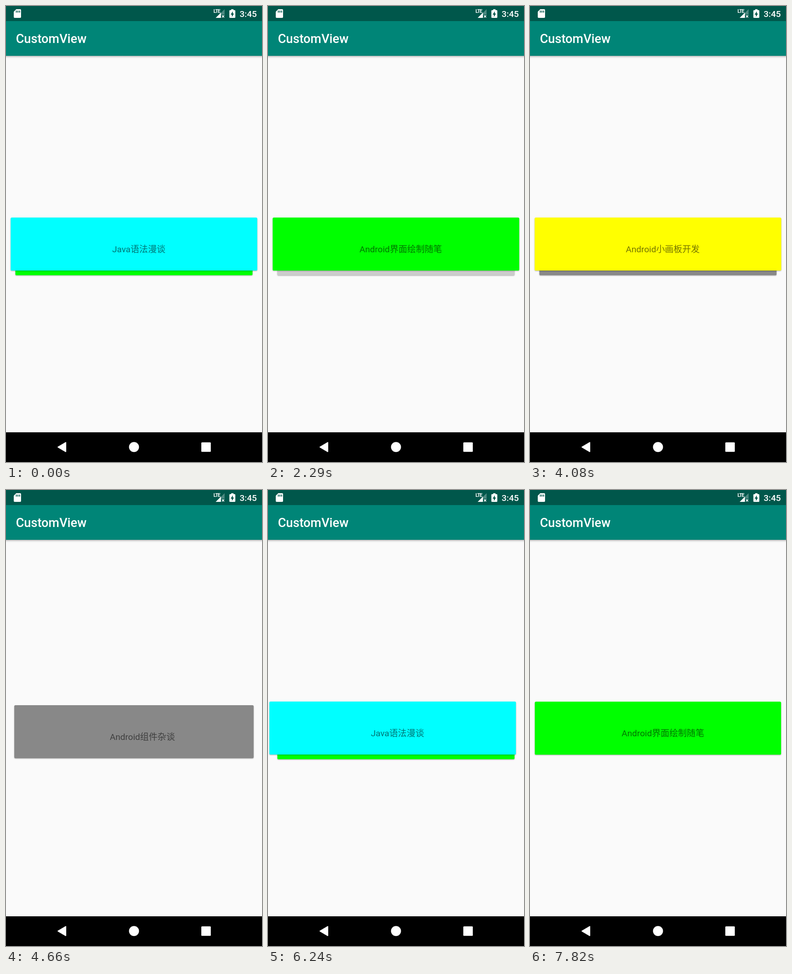
These frames come from a looping animation (561 px wide and 998 px high, 8 s). An HTML page:

```html
<!DOCTYPE html>
<html lang="zh">
<head>
<meta charset="utf-8">
<title>CustomView</title>
<style>
  html, body { margin: 0; width: 100%; height: 100%; overflow: hidden; background: #fafafa; }
  svg { display: block; width: 561px; height: 998px; }
  text { font-family: Roboto, "Noto Sans CJK SC", "Noto Sans CJK", sans-serif; }
  .bar { fill: #fff; font-weight: 500; }
  .card rect { filter: drop-shadow(0 1.4px 1.3px rgba(0, 0, 0, .32)); }
  .card text { font-size: 19.1px; text-anchor: middle; fill: #000; fill-opacity: .54; }
</style>
</head>
<body>
<svg viewBox="0 0 561 998">
  <defs>
    <linearGradient id="shade" x2="0" y2="1">
      <stop offset="0" stop-opacity=".3"/>
      <stop offset=".4" stop-opacity=".1"/>
      <stop offset="1" stop-opacity="0"/>
    </linearGradient>
  </defs>
  <rect width="561" height="998" fill="#fafafa"/>
  <rect y="109" width="561" height="6" fill="url(#shade)"/>
  <rect y="32" width="561" height="77" fill="#008577"/>
  <rect width="561" height="33" fill="#00574b"/>
  <text class="bar" x="21.8" y="81" font-size="27.3">CustomView</text>

  <!-- status icons -->
  <path fill="#fff" d="M22.5 7H31q2 0 2 2v15q0 2-2 2H19q-2 0-2-2V12.500z"/>
  <path stroke="#00574b" stroke-width="1.8" d="M22.600 10v4.500M26.200 10v4.500M29.800 10v4.500"/>
  <text class="bar" x="454.800" y="15" font-size="10.5" letter-spacing="-1" style="font-weight:700">LTE</text>
  <path fill="#fff" fill-opacity=".3" d="M471 15l8-8v12h-8z"/>
  <path fill="#fff" d="M459.500 26L471 14.500V26z"/>
  <path stroke="#fff" stroke-width="1.5" d="M473.300 20.300l4.800 4.800m0-4.800l-4.800 4.800"/>
  <path fill="#fff" d="M493.500 7h5v2H501q1.500 0 1.500 1.500V24.500q0 1.500-1.500 1.500H491q-1.500 0-1.500-1.500V10.500q0-1.500 1.500-1.500h2.500z"/>
  <path fill="#00574b" d="M497 11.500v5h2.700l-4.700 7.500v-5h-2.700z"/>
  <text class="bar" x="512" y="24" font-size="19.1">3:45</text>

  <g id="stack"></g>

  <!-- navigation bar -->
  <rect y="933" width="561" height="65"/>
  <path fill="#fff" stroke="#fff" stroke-width="2" stroke-linejoin="round" d="M114 965.300L131 955.300V975.300z"/>
  <circle cx="280.500" cy="965.200" r="11" fill="#fff"/>
  <rect x="428" y="955" width="20.800" height="20.800" rx="1.500" fill="#fff"/>
</svg>
<script>
const LOOP = 8000, FPS = 24, RISE = 300, INSET = 10.3;

const cards = [
  ['Java语法漫谈', '#00ffff'],
  ['Android界面绘制随笔', '#00ff00'],
  ['Android入门小手册', '#cccccc'],
  ['Android小画板开发', '#ffff00'],
  ['Android组件杂谈', '#888888']
];

// Moments when the front card has left and the next one starts to come forward.
const rises = [1991, 3020, 3740, 4570, 5650, 7525];

const linear = u => u;
const smooth = u => (1 - Math.cos(Math.PI * u)) / 2;
const settle = u => 1 - (1 - u) ** 5;

// Sideways position of the front card: time, x, easing towards that point.
const drag = [
  [0, 0],
  [420, -190, smooth], [1000, 190, smooth], [1640, 0, smooth],
  [1800, -230], [1991, -561, settle], [1991, 0],
  [2640, 0], [2790, 210], [3020, 561, settle], [3020, 0],
  [3370, 0], [3500, -209.5], [3740, -561, settle], [3740, 0],
  [4140, 0], [4300, 210], [4570, 561, settle], [4570, 0],
  [5210, 0], [5400, -250], [5650, -561, settle], [5650, 0],
  [6220, 0], [6410, -120, smooth], [6665, 0, smooth],
  [7140, 0], [7166.6, -41], [7280, -240], [7525, -561, settle], [7525, 0],
  [LOOP, 0]
];

function dragAt(t) {
  const i = drag.findIndex(key => key[0] > t);
  if (i < 0) return 0;
  const [t0, x0] = drag[i - 1], [t1, x1, ease = linear] = drag[i];
  return x0 + (x1 - x0) * ease((t - t0) / (t1 - t0));
}

function make(name, parent, attrs = {}) {
  const el = document.createElementNS('http://www.w3.org/2000/svg', name);
  for (const key in attrs) el.setAttribute(key, attrs[key]);
  return parent.appendChild(el);
}

function makeCard() {
  const group = make('g', document.getElementById('stack'), { class: 'card' });
  return {
    group,
    rect: make('rect', group, { y: 463, height: 116, rx: 2.6 }),
    label: make('text', group, { x: 291, y: 539 })
  };
}

const back = makeCard(), front = makeCard();

// Depth 0 is the front place, depth 1 the place behind it.
function place(view, index, x, depth) {
  const [title, color] = cards[index % cards.length];
  const inset = INSET * depth;
  view.group.setAttribute('transform', `translate(${x} ${inset})`);
  view.rect.setAttribute('x', 10.3 + inset);
  view.rect.setAttribute('width', 540.2 - 2 * inset);
  view.rect.setAttribute('fill', color);
  view.label.setAttribute('x', 291 + inset);
  if (view.label.textContent !== title) view.label.textContent = title;
}

function draw(t) {
  const gone = rises.filter(start => start <= t).length;
  const progress = gone ? Math.min(1, (t - rises[gone - 1]) / RISE) : 1;
  place(front, gone, dragAt(t), 1 - smooth(progress));
  place(back, gone + 1, 0, 1);
  back.group.style.display = progress < 1 ? 'none' : '';
}

function tick() {
  const t = performance.now() % LOOP;
  const step = Math.floor((Math.floor(t / 10) * 10 + 10.01) * FPS / 1000);
  draw(Math.min(step * 1000 / FPS, LOOP - 1));
  requestAnimationFrame(tick);
}

tick();
</script>
</body>
</html>
```
